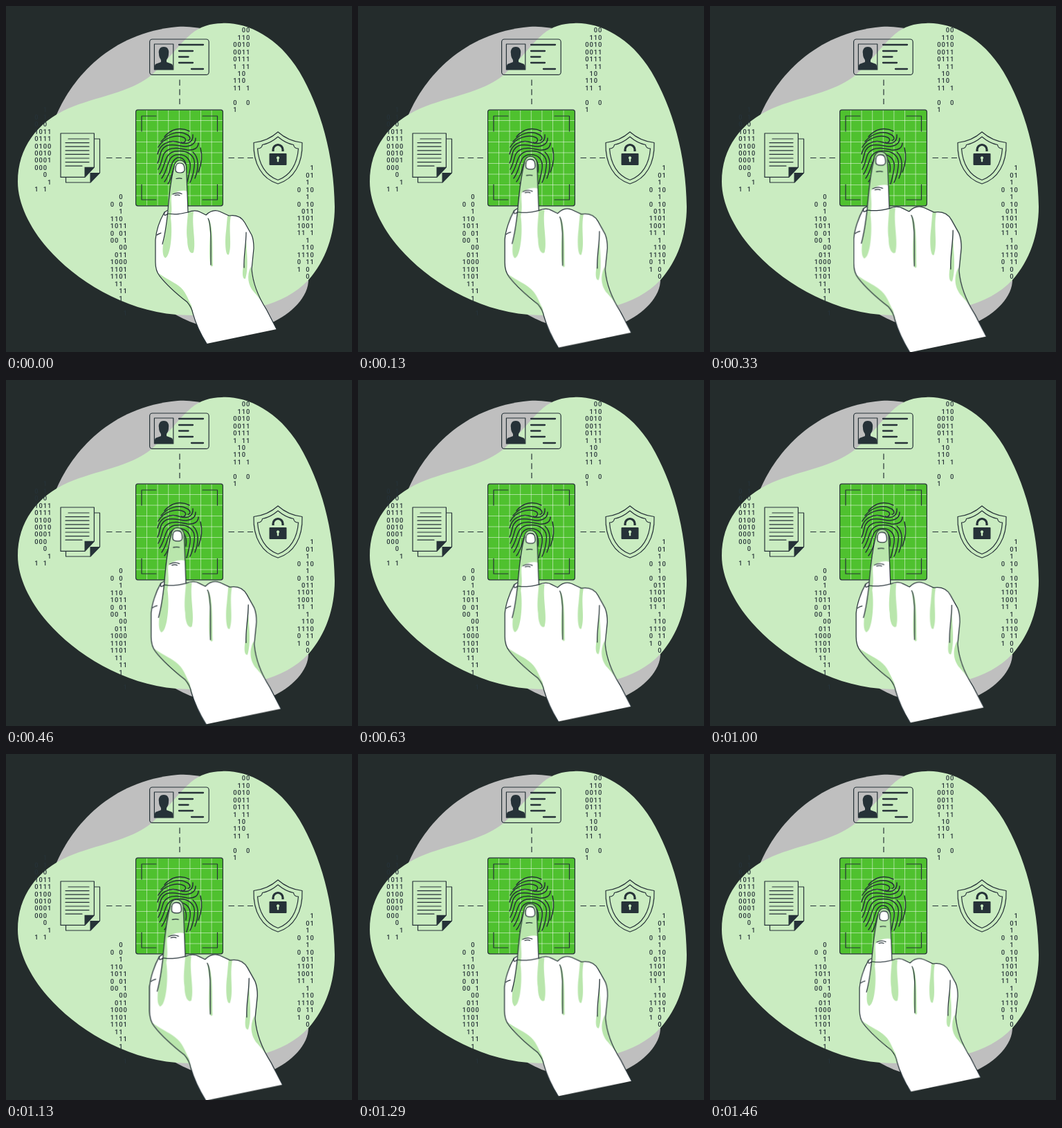
An HTML page for the animation above (1500 ms loop, 500 by 500 pixels).

```html
<!DOCTYPE html>
<html lang="en">
<head>
<meta charset="utf-8">
<title>Fingerprint access</title>
<style>
  html, body { margin: 0; width: 100%; height: 100%; overflow: hidden; background: #242c2c; }
  svg { display: block; width: 100%; height: 100%; }
  .line { fill: none; stroke: #263238; stroke-width: 1.2; stroke-linecap: round; stroke-linejoin: round; }
  .ink { fill: #263238; }
  .mint { fill: #caecc1; }
  .shade { fill: #b9e6ac; }
  .white { fill: #fff; }
  .bold { stroke-width: 2.3; }
  .ridge { stroke-width: 1.5; }
  .dash { stroke-dasharray: 8.5 5.2; stroke-linecap: butt; }
  .digits { font: 500 9.4px Roboto, Arial, sans-serif; text-anchor: middle; }
  .hand { transform-origin: 303.5px 355.5px; animation: pulse 1.5s linear infinite; }
  @keyframes pulse {
    0% { transform: scale(1); }
    20% { transform: scale(1.1); }
    56.4% { transform: scale(1.005); }
    76% { transform: scale(1.1); }
    96%, 100% { transform: scale(1); }
  }
</style>
</head>
<body>
<svg viewBox="0 0 500 500">
  <path fill="#bfbfbf" d="M73 157C96 104 150 39 248 30C300 26 350 60 390 130L437 394C438 420 412 445 383 458C345 475 290 472 245 446Z"/>
  <path class="mint" d="M312 25C345 23 392 42 424 95C455 148 474 215 475 290C475 330 462 368 437 396C420 414 395 428 368 434C330 445 290 449 246 446C170 440 100 396 60 350C34 320 17 285 17 254C17 205 45 168 90 148C130 131 180 125 210 100C235 78 250 55 268 40C280 30 296 25 312 25Z"/>

  <g id="digits" class="digits ink"></g>

  <path class="line dash" d="M251 106.5V142M145 219.5H181M321.5 219.5H357"/>

  <!-- identity card -->
  <rect class="line" x="207.6" y="48" width="85.6" height="51.4" rx="4"/>
  <rect class="line" x="214.4" y="55" width="27.4" height="37"/>
  <path class="ink" d="M228 59C234 59 236 64 235 69C235 74 233 76 232 78V81L240 84Q241.500 86 241.500 92H214.500Q214.500 86 216 84L224 81V78C223 76 221 74 221 69C220 64 222 59 228 59Z"/>
  <path class="line bold" d="M250 56H285M250 65H270M250 73.500H263.500M250 82H270M268 91H285"/>

  <!-- documents -->
  <path class="line" d="M128 192H135.500V241L122 255H86.500V247.500"/>
  <path class="ink" d="M121.500 255.500V241H136Z"/>
  <path class="line" d="M79 184H127.400V233L114 247.400H79Z"/>
  <path class="ink" d="M113.500 247.800V232.800H127.800Z"/>
  <path class="line" d="M90 192H120M86 197.600H120M86 203.200H120M86 208.800H120M86 214.400H120M86 220H120M86 225.600H120M86 231.200H110"/>

  <!-- shield and padlock -->
  <path class="line" d="M393 182C384 190 372 196 358 197.500C357 228 370 250 393 257C416 250 429 228 428 197.500C414 196 402 190 393 182Z"/>
  <path class="line" d="M393 189C386 195 379 199 370.500 200.500C370 204 367 206 363.500 206C365 228 375 245 393 251.500C411 245 421 228 422.500 206C419 206 416 204 415.500 200.500C407 199 400 195 393 189Z"/>
  <rect class="ink" x="380.500" y="213" width="25" height="17" rx="1"/>
  <path class="line" style="stroke-width:3.2;stroke-linecap:butt" d="M386 210V207.500A7 7 0 0 1 400 207.500V210"/>
  <path class="mint" d="M393 217.300A2.200 2.200 0 0 1 394.200 221.300V225.300H391.800V221.300A2.200 2.200 0 0 1 393 217.300Z"/>

  <!-- scanner -->
  <rect fill="#4fc12f" x="187.600" y="150.200" width="125.800" height="138.600" rx="3"/>
  <path id="grid" fill="none" stroke="#fff" stroke-opacity=".5"/>
  <rect class="line" x="187.600" y="150.200" width="125.800" height="138.600" rx="3"/>
  <path class="line" d="M196 181V159H217M284 159H305.500V181M196 258V280H217M284 280H305.500V258"/>
  <g class="line ridge">
    <path d="M229 189C238 178 252 174 265 181"/>
    <path d="M224 196C234 184 250 179 262 186C267 189 267 194 263 194"/>
    <path d="M220 204C228 190 246 185 257 190C262 193 259 199 253 197"/>
    <path d="M219 214C222 200 236 192 250 197C262 201 271 197 270 186"/>
    <path d="M219 227C224 218 221 207 232 202C242 198 250 203 260 203C270 202 274 198 274 191"/>
    <path d="M220 236C228 222 224 212 236 207C244 204 252 206 262 208C272 209 278 205 278 198"/>
    <path d="M281 205C284 216 283 228 278 240"/>
    <path d="M270 211C279 219 279 234 273 249"/>
    <path d="M222 243C232 228 228 214 244 210C262 207 275 216 272 232C271 242 269 249 266 255"/>
    <path d="M225 249C236 234 232 218 246 215C260 213 268 222 266 235C265 243 263 250 261 257"/>
    <path d="M229 254C240 240 236 224 248 219C257 218 262 226 260 240"/>
    <path d="M234 257C242 246 240 228 250 224C257 225 257 234 255 241"/>
  </g>

  <g class="hand">
    <path class="white" d="M290 488C280 472 274 458 270 444C269 438 267 434 262 428C248 417 232 403 222 390C217 384 216 378 216 370V338C217 326 222 310 229 298L234 295C236 270 239 248 243 232C244 220 259 220 260.500 232L263 298C270 295 276 295 281 298L289 302C296 295 302 294 309 297L322 303C334 301 341 306 345 313L355 331C358 338 358 345 358 350L355 380C357 405 367 424 376 438L391 467Z"/>
    <g class="shade">
      <path d="M234 297C236 270 239 248 243 232C244 220 259 220 260.500 232L262 268C256 265 244 268 239 274C238 284 241 292 238 306C241 326 238 362 230 364C225 361 226 346 229 333Z"/>
      <path d="M263 298L271 297C268 316 275 342 271 356C266 360 262 350 262 338C260 325 262 312 263 298Z"/>
      <path d="M292 306C300 316 298 350 299 375C294 383 293 355 295 330Z"/>
      <path d="M320 303L325 303C321 322 327 345 322 359C317 363 316 340 318 325Z"/>
      <path d="M347 327C346 345 352 375 346 394C341 396 341 382 344 372Z"/>
      <path d="M219 385C229 393 241 398 249 404C260 412 262 422 268 433C269 439 271 444 272 449L262 428C248 417 232 403 219 385Z"/>
      <path d="M354 376C347 390 350 404 358 413C366 422 372 430 378 441L368 425C358 406 356 394 354 376Z"/>
    </g>
    <path class="line" d="M290 488C280 472 274 458 270 444C269 438 267 434 262 428C248 417 232 403 222 390C217 384 216 378 216 370V338C217 326 222 310 229 298L234 295C236 270 239 248 243 232C244 220 259 220 260.500 232L263 298C270 295 276 295 281 298L289 302C296 295 302 294 309 297L322 303C334 301 341 306 345 313L355 331C358 338 358 345 358 350L355 380C357 405 367 424 376 438L391 467"/>
    <path class="line" d="M229 298C228 304 230 303 234 300M234 296C232 315 230 330 226 344M218 331C220 329 222 329 224 328M234 300C246 302 254 300 263 298M292 307C297 315 296 345 296 374M347 327C347 345 343 362 344 378M246 249.500C249 248.800 252 248.800 254 249.300M241 272C246 269.500 250 269.500 254 271.500M244 273.500C247 272.500 249 272.500 251 273.500"/>
    <path class="line white" style="fill:#fff" d="M245 236C245 229 247 227 251 227C256 227 257.500 229 258 236C258 240 256 241 252 241C247 241 245 240 245 236Z"/>
  </g>
</svg>
<script>
  // Each block: x and y of the first digit, then its rows from top to bottom.
  const blocks = [
    [331, 35, "  00| 110|0010|0011|0111|1 11| 10|110|11 1||0  0|1"],
    [44, 150, "  1|0 1|0 0|1011|0111|0100|0010|0001|000|  0|   1|1 1"],
    [153.500, 276, "  0|0 0|  1|110|1011|0 01|00 1|  00| 011|1000|1101|1101| 11|  11|  1||   1"],
    [423.500, 234, "   1|  01|  1|0 10|  1|0 10| 011|1101|1001|11 1|  1| 110|1110|0 11|1 0|  0"]
  ];
  const digits = document.getElementById("digits");

  for (const [x, y, rows] of blocks) {
    rows.split("|").forEach((row, r) => {
      [...row].forEach((char, c) => {
        if (char === " ") return;
        const text = document.createElementNS(digits.namespaceURI, "text");
        text.setAttribute("x", x + c * 6.200);
        text.setAttribute("y", y + r * 10.450 + 3.300);
        text.textContent = char;
        digits.append(text);
      });
    });
  }

  let grid = "";
  for (let i = 0; i < 7; i++) grid += `M${203.5 + i * 15.6} 150.500V288.500`;
  for (let i = 0; i < 8; i++) grid += `M188 ${165.5 + i * 15.5}H313`;
  document.getElementById("grid").setAttribute("d", grid);
</script>
</body>
</html>
```
